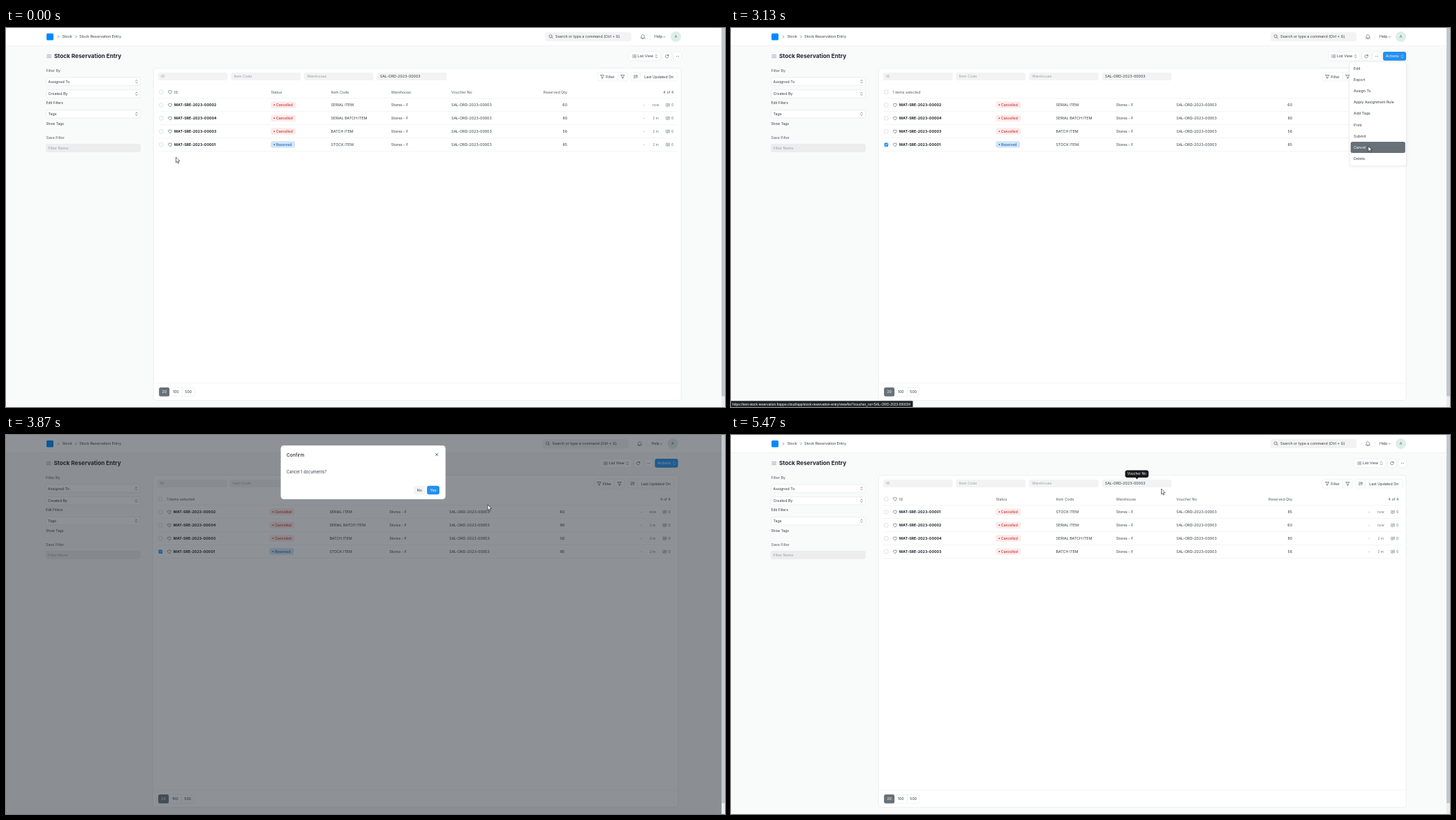
These frames come from a looping animation (1030x543 px, 6.59 s). An HTML page:

```html
<!DOCTYPE html>
<html lang="en">
<head>
<meta charset="utf-8">
<title>Stock Reservation Entry</title>
<style>
html, body { margin: 0; width: 100%; height: 100%; overflow: hidden; background: #f9fafa; }
svg { display: block; width: 1030px; height: 543px; font-family: Inter, sans-serif; }
</style>
</head>
<body>
<svg id="stage" viewBox="0 0 1030 543" xmlns="http://www.w3.org/2000/svg"></svg>
<script>
const LOOP = 6590, STEP = 200 / 3;
const INK = '#333c44', DARK = '#1f272e', MUTED = '#6c7680', HINT = '#98a1a9';
const LINE = '#e8ebed', FIELD = '#f3f3f4', BLUE = '#2490ef';
const stage = document.getElementById('stage');

const clamp = v => Math.max(0, Math.min(1, v));
const ramp = (t, from, length) => clamp((t - from) / length);
const ease = {
  in: p => p ** 1.4,
  out: p => 1 - (1 - p) ** 2,
  both: p => p * p * (3 - 2 * p)
};
// CSS ease-out: cubic-bezier(0, 0, .58, 1)
function cssOut(p) {
  let lo = 0, hi = 1;
  for (let i = 0; i < 20; i++) {
    const m = (lo + hi) / 2;
    if (1.74 * m * m * (1 - m) + m ** 3 < p) lo = m; else hi = m;
  }
  return lo * lo * (3 - 2 * lo);
}

// time, x, y, easing towards this point
const PATH = [
  [0, 243.5, 185.5], [600, 222, 167.5, 'both'], [900, 222, 167.5, 'both'],
  [1470, 798, 54, 'in'], [1930, 937.5, 53.5, 'out'], [2070, 937.5, 53.5, 'both'],
  [2270, 935.5, 57, 'both'], [3060, 912.8, 169.5, 'both'], [3330, 912.8, 169.5, 'both'],
  [4130, 616.5, 77.5, 'both'], [LOOP, 616.5, 77.5, 'both']
];
function pointer(t) {
  const i = PATH.findIndex((k, n) => n && t <= k[0]);
  const a = PATH[i - 1], b = PATH[i];
  const p = ease[b[3]]((t - a[0]) / (b[0] - a[0]));
  return [a[1] + (b[1] - a[1]) * p, a[2] + (b[2] - a[2]) * p];
}

// SVG helpers; text is placed by the middle of its capitals
const text = (x, y, s, o = {}) => {
  const size = o.size || 5.3;
  return `<text x="${x}" y="${y + size * .364}" font-size="${size}" fill="${o.fill || INK}"` +
    ` font-weight="${o.weight || 400}" text-anchor="${o.anchor || 'start'}">${s}</text>`;
};
const rect = (x, y, w, h, fill, r = 0, stroke = 'none', sw = .5) =>
  `<rect x="${x}" y="${y}" width="${w}" height="${h}" rx="${r}" fill="${fill}" stroke="${stroke}" stroke-width="${sw}"/>`;
const path = (x, y, d, stroke = INK, sw = .55, fill = 'none') =>
  `<path transform="translate(${x} ${y})" d="${d}" fill="${fill}" stroke="${stroke}" stroke-width="${sw}" stroke-linecap="round" stroke-linejoin="round"/>`;
const group = (dx, dy, body, opacity = 1) =>
  `<g transform="translate(${dx} ${dy})" opacity="${opacity}">${body}</g>`;

const ICON = {
  updown: 'M-1.3 -.9L0 -2.2L1.3 -.9M-1.3 .9L0 2.2L1.3 .9',
  right: 'M-.8 -1.6L.8 0L-.8 1.6',
  down: 'M-1.3 -.6L0 .7L1.3 -.6',
  menu: 'M-3 -2H3M-3 0H3M-3 2H3',
  heart: 'M0 2.4L-2.2 .2C-3.4 -1.4 -1.2 -3.2 0 -1.4C1.2 -3.2 3.4 -1.4 2.2 .2Z',
  funnel: 'M-2.5 -2.2H2.5L.8 .2V2L-.8 2.4V.2Z',
  sort: 'M-2.6 -1.8H1M-2.6 0H-.2M-2.6 1.8H-.2M1.8 2V-1.6M.7 -.5L1.8 -1.7L2.9 -.5',
  reload: 'M2 -1.1A2.3 2.3 0 1 0 2.3 .4M2.2 -2.5V-1H.7',
  note: 'M-2.3 -2H2.3V1.5H0L-1.3 2.5V1.5H-2.3ZM-1 -.7H1.1M-1 .4H.6',
  bell: 'M-2.8 1.6C-1.8 .6 -2.2 -.4 -1.9 -1.4C-1.2 -3.5 1.2 -3.5 1.9 -1.4C2.2 -.4 1.8 .6 2.8 1.6ZM-.8 2.8H.8',
  cross: 'M-1.9 -1.9L1.9 1.9M1.9 -1.9L-1.9 1.9',
  tick: 'M-1.5 0L-.4 1.1L1.6 -1.2'
};

const ROWS = [
  ['2', 'SERIAL ITEM', 60, 'now'],
  ['4', 'SERIAL BATCH ITEM', 80, '2 m'],
  ['3', 'BATCH ITEM', 56, '2 m'],
  ['1', 'STOCK ITEM', 85, '2 m']
];
const MENU = ['Edit', 'Export', 'Assign To', 'Apply Assignment Rule', 'Add Tags', 'Print', 'Submit', 'Cancel', 'Delete'];
const VOUCHER = 'SAL-ORD-2023-00003';
const LINK = 'https://test-stock-reservation.frappe.cloud/app/stock-reservation-entry/view/list?voucher_no=' + VOUCHER + '#';

const scrollbar = () => rect(1025, 0, 5, 543, '#e9ecee') + rect(1025, 0, 5, 527.5, '#c0c6cc');

const navRight = () =>
  rect(773, 6, 123, 13, FIELD, 3) +
  path(780.7, 12.3, 'M1 1L2.6 2.6M1.6 -.5A2.1 2.1 0 1 1 -2.6 -.5A2.1 2.1 0 1 1 1.6 -.5') +
  text(787, 12.5, 'Search or type a command (Ctrl + G)') +
  path(912.3, 12.5, ICON.bell) + rect(922.3, 8, .5, 9, '#dfe3e6') +
  text(929, 12.5, 'Help') + path(943.2, 12.7, ICON.down) +
  '<circle cx="959.6" cy="12.5" r="7.5" fill="#dfeee8"/>' +
  text(959.6, 12.5, 'A', { anchor: 'middle', fill: '#44806a' });

const navLeft = () =>
  rect(58, 7.8, 10, 9.8, '#0089ff', 1.5) +
  path(75, 12.5, ICON.right) + text(80.5, 12.5, 'Stock') +
  path(100.3, 12.5, ICON.right) + text(105, 12.5, 'Stock Reservation Entry');

function sidebar() {
  const pick = (y, label) => rect(57.5, y - 5.7, 135, 11.4, '#fff', 2.5, '#dce0e3') +
    text(60.5, y, label) + path(187, y, ICON.updown);
  return path(61.7, 40.5, ICON.menu, MUTED) +
    text(69, 40.2, 'Stock Reservation Entry', { size: 8.2, weight: 700, fill: DARK }) +
    text(57.5, 61.2, 'Filter By', { fill: '#505a62' }) +
    pick(76.6, 'Assigned To') + pick(94.3, 'Created By') +
    text(57.5, 107.6, 'Edit Filters', { size: 4.9 }) + pick(123.2, 'Tags') +
    text(57.5, 136.8, 'Show Tags', { size: 4.86 }) +
    text(57.5, 156.6, 'Save Filter', { fill: '#505a62' }) +
    rect(57.5, 166.3, 135, 11.2, '#ededee', 2.5, '#e2e5e7') +
    text(60.5, 172, 'Filter Name', { fill: HINT });
}

function headButtons(selected, focus) {
  const box = (x, w) => rect(x, 34, w, 12.8, '#fff', 3, '#e0e4e7');
  const dots = [-1.6, 0, 1.6].map(d => `<circle cx="${962 + d}" cy="40.5" r=".45" fill="${INK}"/>`).join('');
  const view = box(892.3, 45.5) + path(900, 40.5, 'M-2.8 -1.8H-2.6M-1.2 -1.8H2.8M-2.8 0H-2.6M-1.2 0H2.8M-2.8 1.8H-2.6M-1.2 1.8H2.8') +
    text(904.7, 40.4, 'List View') + path(931.5, 40.4, ICON.updown) +
    box(940.8, 12.5) + path(947, 40.5, ICON.reload) + box(956, 11.7) + dots;
  if (!selected) return view;
  return group(-36.8, 0, view) +
    (focus ? rect(933.2, 33.3, 34.9, 14.2, '#b5d9f9', 3.6) : '') +
    rect(934, 34.1, 33.2, 12.6, focus ? '#1a80dc' : BLUE, 3) +
    text(938, 40.4, 'Actions', { fill: '#fff' }) + path(961.5, 40.4, ICON.updown, '#fff');
}

const sortButtons = () =>
  rect(847, 63.3, 44, 12.7, '#fff', 3, '#e0e4e7') + rect(876, 63.3, .5, 12.7, '#e0e4e7') +
  path(854.2, 69.7, ICON.funnel) + text(859.2, 69.6, 'Filter') + path(883.5, 69.7, ICON.funnel) +
  rect(894.8, 63.3, 67, 12.7, '#fff', 3, '#e0e4e7') + rect(908.5, 63.3, .5, 12.7, '#e0e4e7') +
  path(902, 69.7, ICON.sort) + text(914.3, 69.6, 'Last Updated On');

function checkbox(x, y, on, glow) {
  const halo = glow ? rect(x - 3.6, y - 3.6, 7.2, 7.2, '#cfe5fa', 1.8) : '';
  return halo + (on
    ? rect(x - 2.8, y - 2.8, 5.6, 5.6, BLUE, 1.2) + path(x, y, ICON.tick, '#fff', .8)
    : rect(x - 2.6, y - 2.6, 5.2, 5.2, '#fff', 1.2, '#bcc3c9'));
}

function list(t, s) {
  const X = x => s.shift ? x - .3 - (x - 57) / 910 * 4.2 : x;
  const right = x => x - s.shift;
  let out = rect(X(211.3), 57.6, X(967.3) - X(211.3), 476, '#fff', 4, LINE, .8);
  ['ID', 'Item Code', 'Warehouse', VOUCHER].forEach((label, i) => {
    const x = X(217.7 + 104.6 * i);
    out += rect(x, 63.7, 99.7, 11.3, FIELD, 2.5) +
      text(x + 4.3, 69.4, label, { fill: i === 3 ? INK : HINT });
  });
  out += checkbox(X(222.4), 91.7, false);
  const head = { fill: '#505a62' };
  if (s.selected) out += text(X(231.5), 91.6, '1 items selected', head);
  else {
    out += path(X(235), 91.7, ICON.heart);
    [[241, 'ID'], [379.4, 'Status'], [465.6, 'Item Code'], [551.8, 'Warehouse'], [638, 'Voucher No']]
      .forEach(([x, label]) => out += text(X(x), 91.6, label, head));
    out += text(X(804), 91.6, 'Reserved Qty', { anchor: 'end', ...head });
  }
  out += text(right(956.5), 91.6, s.refreshing ? 'Refreshing...' : '4 of 4', { anchor: 'end', ...head });

  const rows = s.cancelled ? [[...ROWS[3].slice(0, 3), 'now'], ...ROWS.slice(0, 3)] : ROWS;
  rows.forEach(([id, item, qty, age], i) => {
    const y = 110.2 + 18.93 * i, live = id === '1' && !s.cancelled;
    const tone = live ? '#1c62a8' : '#c8302f';
    out += rect(X(218), y - 9.6, X(961) - X(218), .5, LINE) +
      checkbox(X(222.4), y + .2, live && s.selected, live && s.glow) +
      path(X(235), y + .2, ICON.heart) +
      text(X(241), y - .1, 'MAT-SRE-2023-0000' + id, { weight: 700, fill: DARK }) +
      rect(X(379.3), y - 4.7, live ? 34.7 : 35.8, 9.3, live ? '#cfe5fa' : '#fdeaea', 2.5) +
      `<circle cx="${X(384.3)}" cy="${y}" r=".9" fill="${tone}"/>` +
      text(X(387), y, live ? 'Reserved' : 'Cancelled', { size: 4.98, weight: 500, fill: tone }) +
      text(X(465.6), y + .2, item) + text(X(551.8), y + .2, 'Stores - F') + text(X(638), y + .2, VOUCHER) +
      text(X(804), y, qty, { anchor: 'end' }) +
      text(right(914.3), y, '-', { anchor: 'middle', fill: MUTED }) +
      text(right(930.8), y + .1, age, { anchor: 'middle', size: 4.8, fill: MUTED }) +
      path(right(948.3), y + .2, ICON.note, MUTED) + text(right(953), y, '0', { fill: MUTED });
  });
  out += rect(X(218), 176.4, X(961) - X(218), .5, LINE) + rect(X(211.6), 508.7, X(967) - X(211.6), .5, LINE);

  const px = X(219.2);
  out += rect(px, 515, 51, 12.7, '#fff', 3, '#e0e4e7') + rect(px, 515, 15, 12.7, '#687178', 2.5) +
    rect(px + 33, 515, .5, 12.7, '#e0e4e7');
  [[7.5, '20', '#fff'], [24, '100', INK], [42, '500', INK]].forEach(([dx, label, fill]) =>
    out += text(px + dx, 521.3, label, { anchor: 'middle', fill }));
  return out;
}

function menu(y, pressed) {
  let out = rect(886, 49.5, 82, 149.5, '#000', 4).replace('/>', ' opacity=".06" filter="url(#soft)"/>') +
    rect(886, 48.4, 81.5, 149, '#fff', 3.5, '#dfe3e6');
  MENU.forEach((label, i) => {
    const cy = 57.6 + 16.2 * i, hot = Math.abs(y + 1 - cy) <= 8.1;
    if (hot) out += rect(887.7, cy - 8, 78.2, 16, pressed ? '#687178' : '#f3f4f5', 2.5);
    out += text(892, cy, label, { fill: hot && pressed ? '#fff' : INK });
  });
  return out;
}

const dialog = () =>
  rect(396, 15, 236, 77, '#fff', 4.5) +
  text(404.5, 29, 'Confirm', { size: 6.5, weight: 500, fill: DARK }) +
  path(619.5, 28, ICON.cross, INK, .7) +
  text(404.5, 53, 'Cancel 1 documents?', { size: 5.7 }) +
  rect(586.5, 72.7, 16.5, 12.6, '#f3f4f5', 3) + text(594.7, 79, 'No', { anchor: 'middle' }) +
  rect(605.5, 72.7, 17.8, 12.6, BLUE, 3) + text(614.4, 79, 'Yes', { anchor: 'middle', fill: '#fff' });

const cursor = ([x, y], hand) => hand
  ? path(x, y, 'M-.9 5.6V.7C-.9 -.4 .7 -.4 .7 .7V3.6C1 3 2 3.1 2.1 3.9C2.5 3.4 3.4 3.6 3.5 4.3C4 4 4.7 4.3 4.7 5V7C4.7 8.3 3.8 8.7 3.7 9.7H-.2C-.5 8.3 -1.8 7.3 -2.8 5.8C-3 4.9 -2 4.6 -1.5 5.1Z', '#111', .6, '#fff')
  : path(x, y, 'M0 0V7.3L1.7 5.8L2.9 8.5L4.1 8L2.9 5.3L5.2 5.2Z', '#111', .6, '#fff');

function draw(t) {
  const within = (a, b) => t >= a && t < b;
  const s = {
    shift: within(3330, 4730) ? 4.5 : 0,
    selected: within(870, 4670),
    glow: within(730, 2070),
    cancelled: t >= 4670,
    refreshing: within(4670, 4730)
  };
  const at = pointer(t);
  const dim = .5 * (ramp(t, 3135, 120) - ramp(t, 4560, 150));
  const fade = ramp(t, 3255, 150) - ramp(t, 4400, 150);
  const drop = cssOut(ramp(t, 3255, 300)) - cssOut(ramp(t, 4400, 300));
  const modal = within(3330, 4560);
  const pressed = within(3130, 3200);
  const hand = within(1870, 3130) || within(4070, 4600);
  const tip = t < 5400 ? 0 : t < 5470 ? .5 : 1;

  let out = '<defs><filter id="soft" x="-20%" y="-20%" width="140%" height="140%"><feGaussianBlur stdDeviation="2"/></filter></defs>' +
    rect(0, 0, 1030, 543, '#f9fafa') + rect(0, 0, 1030, 25, '#fff') + rect(0, 25, 1030, .5, LINE) +
    navLeft() + group(s.shift ? -.5 : 0, 0, sidebar()) +
    list(t, s) +
    group(-s.shift, 0, navRight() + headButtons(s.selected, within(2070, 3100)) + sortButtons()) +
    scrollbar();
  if (within(2070, 3200)) out += menu(at[1], pressed);
  if (dim > 0) out += rect(0, 0, 1030, 543, `rgba(31,39,46,${dim})`);
  if (modal) out += scrollbar();
  if (fade > 0) out += group(s.shift ? -2.4 : 0, -27 * (1 - drop), dialog(), fade);
  if (tip) out += group(0, 0, rect(564.6, 50.4, 33.6, 10.6, '#16191c', 3) +
    path(581.5, 61, 'M-2 0H2L0 2.4Z', 'none', 0, '#16191c') +
    text(581.4, 55.6, 'Voucher No', { size: 4.86, anchor: 'middle', fill: '#fff' }), tip);
  if (within(2730, 3400)) out += rect(-1, 534.2, 261.5, 10, '#202124', 1) +
    `<text x="2" y="540.7" font-size="4.97" fill="#fff" font-family="Liberation Sans, Arial, sans-serif">${LINK}</text>`;
  stage.innerHTML = out + cursor(at, hand);
}

const start = performance.now();
let last = -1;
function tick() {
  const now = (performance.now() - start) % LOOP;
  const step = Math.floor((now + 4) / STEP);
  if (step !== last) {
    last = step;
    draw(Math.round(step * STEP / 10) * 10);
  }
  requestAnimationFrame(tick);
}
tick();
</script>
</body>
</html>
```
